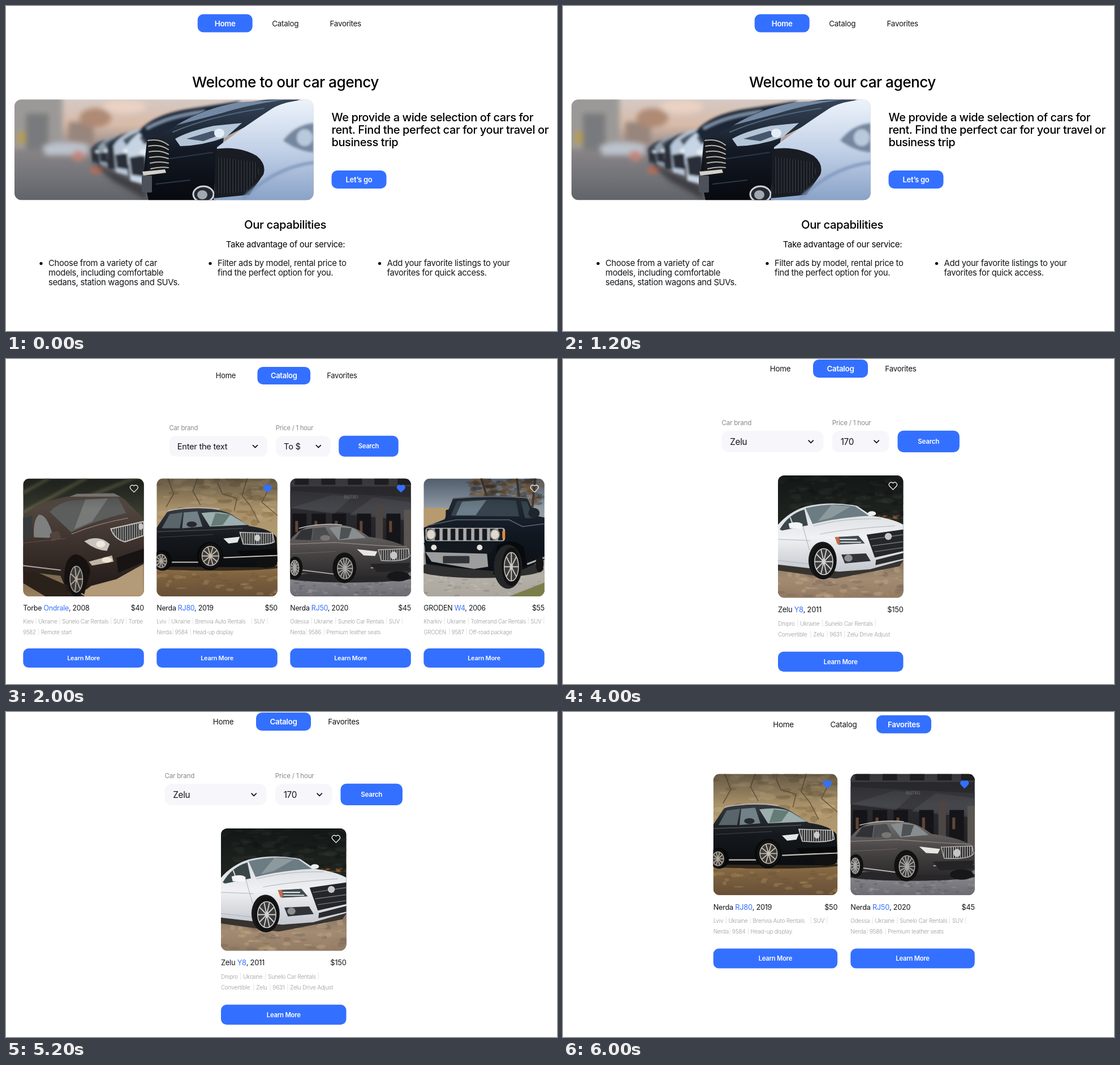
Animation, 974 px wide and 575 px high, one loop 8000 ms. Source, as an HTML page:

```html
<!DOCTYPE html>
<html lang="en">
<head>
<meta charset="utf-8">
<title>Car rental</title>
<style>
html, body { margin: 0; width: 100%; height: 100%; overflow: hidden; background: #fff; }
svg { display: block; width: 974px; height: 575px; }
text { font-family: Inter, "Open Sans", sans-serif; letter-spacing: -.02em; white-space: pre; }
</style>
</head>
<body>
<svg id="stage" viewBox="0 0 974 575"></svg>
<script>
const BLUE = '#3470ff', INK = '#121417';

// --- drawing helpers ---
const rect = (x, y, w, h, fill, r = 0, more = '') =>
  `<rect x="${x}" y="${y}" width="${w}" height="${h}" rx="${r}" fill="${fill}" ${more}/>`;
const path = (d, fill, more = '') => `<path d="${d}" fill="${fill}" ${more}/>`;
const line = (d, color, w = 1) => path(d, 'none', `stroke="${color}" stroke-width="${w}" stroke-linecap="round" stroke-linejoin="round"`);
const oval = (x, y, rx, ry, fill, more = '') => `<ellipse cx="${x}" cy="${y}" rx="${rx}" ry="${ry}" fill="${fill}" ${more}/>`;
const text = (x, y, size, s, { w = 400, fill = INK, a = 'start' } = {}) =>
  `<text x="${x}" y="${y}" font-size="${size}" font-weight="${w}" fill="${fill}" text-anchor="${a}">${s}</text>`;
const group = (x, y, k, s) => `<g transform="translate(${x} ${y}) scale(${k})">${s}</g>`;
const blur = (n, s) => `<g filter="url(#blur${n})">${s}</g>`;
const ramp = (id, colors) => `<linearGradient id="${id}" x2="0" y2="1">` +
  colors.map((c, i) => `<stop offset="${i / (colors.length - 1)}" stop-color="${c}"/>`).join('') + '</linearGradient>';

function specks(seed, n, x, y, w, h, colors, size = 5) {
  const rnd = () => (seed = seed * 16807 % 2147483647) / 2147483647;
  let s = '';
  for (let i = 0; i < n; i++)
    s += oval((x + rnd() * w).toFixed(1), (y + rnd() * h).toFixed(1), (size * (.5 + rnd())).toFixed(1),
      (size * (.2 + rnd() * .4)).toFixed(1), colors[i % colors.length], 'opacity=".4"');
  return s;
}

function wheel(x, y, rx, ry, rim = '#b9b7b3', spokes = 10) {
  let s = oval(x, y, rx, ry, '#121213') + oval(x, y, rx * .74, ry * .74, '#3b3a3a', `stroke="${rim}" stroke-width="1.5"`);
  for (let i = 0; i < spokes; i++) {
    const a = i / spokes * 2 * Math.PI;
    s += line(`M${x} ${y}l${(Math.cos(a) * rx * .7).toFixed(1)} ${(Math.sin(a) * ry * .7).toFixed(1)}`, rim, 1.8);
  }
  return s + oval(x, y, rx * .16, ry * .16, rim);
}

// --- pictures, each 213.5 x 208.5 ---
const backdrop = (fill, ground, y) => rect(0, 0, 214, 209, fill) + rect(0, y, 214, 209 - y, ground);

const brownCar = () => backdrop('url(#wood)', 'url(#track)', 120) +
  blur(2, line('M0 60L110 0M0 25L45 0M120 30L214 -8', '#5b5b42', 6) + path('M110 190L214 150V209H60Z', '#b39a78')) +
  path('M0 155L80 190L110 209H40L0 185Z', '#2b211b') +
  path('M0 66L24 47Q82 25 150 26Q176 29 188 46L213 70V151L165 178L120 190L112 196L78 200L66 172L0 164Z', 'url(#brown)') +
  path('M82 32L95 27L160 26L172 32Z', '#8c8681') +
  path('M47 59Q62 43 84 39L168 34L182 61Q125 75 85 95Z', '#5c5e5d') +
  path('M110 37L150 35L122 76L90 90Z', '#a1a29d', 'opacity=".4"') +
  path('M19 104Q17 73 28 64Q42 63 52 99L46 105Z', '#7d807e') + path('M0 70L16 66L14 104L0 108Z', '#383b3b') +
  path('M47 100Q50 91 64 94L67 106L51 111Z', '#51443d') +
  line('M86 98Q130 80 185 70', '#85776e', 1.5) + line('M0 114L75 106', '#605149', 1) + line('M0 154L66 162', '#b1a69c', 2) +
  path('M108 111Q134 98 153 116L148 128Q128 127 108 111Z', '#c9c5bd') + oval(137, 116, 8, 6, '#eee9df') +
  path('M155 89L213 76V101L180 112Q162 108 155 89Z', 'url(#bars)', 'stroke="#cac4bb" stroke-width="2"') + oval(208, 85, 4, 6, '#c4c4c4') +
  path('M116 147L157 136L160 147L122 154Z', '#c2b4a4') + oval(148, 144, 9, 5, '#efe4d1') +
  path('M165 140L213 124V148L168 167Z', '#171413') + path('M73 185Q70 140 92 134Q114 137 119 164L108 205Z', '#17120f') +
  wheel(94, 178, 15, 31, '#b6aa9c', 7);

const blackCar = () => backdrop('url(#rock)', 'url(#sand)', 130) +
  specks(7, 100, 0, 0, 214, 80, ['#c6ad82', '#75613f', '#aa9065'], 10) +
  line('M20 0L30 27L17 50M72 0L64 22L77 46M108 8L116 27L142 35L137 57M160 0L151 30L166 49L181 78M200 14L186 42L214 66', '#6b5a40', 1.6) +
  specks(4, 80, 0, 133, 214, 74, ['#a78758', '#6b5436'], 6) +
  oval(100, 157, 118, 6, '#33291c') +
  path('M0 87L18 60Q24 55 56 53Q108 50 133 64L164 84Q202 89 212 104L214 147L194 157L0 156Z', 'url(#black)') +
  line('M20 57Q65 48 110 54', '#b9b9b4', 1.8) +
  path('M9 88L23 63L46 60L41 88Z', '#59656b') + path('M48 60L72 58L81 85L45 88Z', '#728087') +
  path('M79 61Q121 55 139 69L161 82L94 85Z', '#9caeae') + path('M104 61L130 64L117 82L96 84Z', '#647b76') +
  oval(62, 81, 9, 5, '#27292d') + line('M0 94L88 91L151 88', '#555a60', 1.2) + line('M4 104L100 99', '#3e4248', 1) +
  line('M25 148L73 148M119 140L213 136', '#c7c1b5', 2.2) +
  path('M118 106L147 103L143 113L127 115Z', '#e2e6e7') +
  path('M147 95L205 97L208 112Q197 119 153 116Z', 'url(#bars)', 'stroke="#c8c8c5" stroke-width="1.5"') + oval(178, 105, 5, 6, '#c9cccd') +
  path('M143 128L212 125V135L150 137Z', '#08090b') +
  oval(94, 137, 23, 25, '#08090a') + oval(10, 145, 17, 18, '#08090a') + oval(193, 150, 20, 8, '#111') +
  wheel(95, 137, 20, 23, '#c4bcae') + wheel(8, 146, 13, 16, '#b1a99c');

const greyCar = () => backdrop('url(#street)', 'url(#cobble)', 146) +
  rect(0, 0, 214, 14, '#4d4b4d') + [8, 55, 102, 149, 190].map(x => rect(x, 0, 25, 11, '#242326')).join('') +
  path('M0 22L214 33V70L0 52Z', '#39393e') + path('M0 52L75 29L110 32L78 62ZM105 64L147 33L214 42V75Z', '#4b4c52', 'opacity=".7"') +
  text(95, 35, 7, 'BISTRO', { fill: '#77706c', w: 600 }) +
  [4, 38, 74, 118, 170].map(x => rect(x, 62, 25, 64, '#151519') + rect(x + 5, 75, 5, 20, '#614636')).join('') +
  rect(151, 38, 13, 92, '#4b4644') + rect(201, 55, 13, 75, '#5b5551') +
  specks(3, 110, 0, 158, 214, 50, ['#9a999e', '#56555b'], 4) + oval(105, 175, 112, 9, '#27272a') +
  path('M0 109Q15 88 38 84Q78 78 105 85Q119 88 139 103Q196 111 211 126L214 164L199 174L110 174L0 166Z', 'url(#grey)') +
  line('M16 88Q54 78 91 82', '#c6c3bf', 1.5) +
  path('M8 108L20 91L40 88L37 109Z', '#313236') + path('M41 88L62 86L73 107L39 109Z', '#4a4d50') +
  path('M69 87Q99 81 115 90L134 105L86 109Z', '#888e90') + path('M90 86L109 88L103 105L87 108Z', '#4d5355') +
  oval(62, 105, 9, 5, '#777575') + line('M0 116L80 113L149 118L206 121', '#88827e', 1.3) + line('M3 133L80 129', '#696461', 1) +
  line('M22 162L77 169M143 158L211 156', '#c2c0bd', 1.6) +
  path('M118 125L154 129L150 137L130 136Z', '#e6e6e2') +
  path('M156 126L209 124L212 137Q203 148 161 145Z', 'url(#bars)', 'stroke="#b6b4b1" stroke-width="1.4"') + oval(183, 136, 6, 7, '#c7c7c7') +
  path('M141 151L211 149V163L154 166Z', '#242426') +
  oval(96, 158, 21, 27, '#111') + oval(9, 158, 13, 20, '#111') + oval(191, 173, 20, 9, '#171719') +
  wheel(97, 159, 18, 25, '#aaa8a5', 14) + wheel(8, 158, 10, 18, '#aaa8a5', 12);

const boxCar = () => backdrop('url(#autumn)', 'url(#gravel)', 132) +
  rect(0, 52, 90, 50, '#b69b70') + specks(15, 140, 85, 0, 129, 44, ['#61452d', '#a4773f', '#39362c'], 8) +
  line('M165 0L174 85M102 0L114 40M197 0L190 75', '#4c3e32', 4) +
  specks(8, 90, 0, 150, 214, 58, ['#c9c5be', '#827d76'], 4) + path('M150 209L214 184V209Z', '#7c7e4a') +
  oval(100, 160, 112, 16, '#302f30') +
  path('M37 72L52 35Q118 29 183 35L199 66L214 69V143L162 167L45 157L4 151L0 87Z', 'url(#navy)') +
  path('M48 66L59 40Q111 35 163 39L169 67Z', '#36434c') + path('M68 41L111 38L92 65H57Z', '#6b7d88') +
  path('M172 40L183 41L194 70H179Z', '#35434c') + oval(195, 61, 10, 9, '#1e252d') + rect(39, 55, 9, 17, '#1a2028', 3) +
  line('M53 35Q117 29 182 34', '#6e757d', 2) + line('M8 83L57 73H151L175 85L214 80', '#586777', 1.4) +
  rect(4, 88, 139, 22, 'url(#slots)', 4, 'stroke="#b5b6b6" stroke-width="1.6"') +
  [13, 126].map(x => oval(x, 99, 8, 9, '#ded9cc', 'stroke="#848482" stroke-width="2"')).join('') +
  rect(139, 93, 5, 13, '#e18a38', 1) + path('M0 114H127L120 132L5 128Z', '#14191f') +
  path('M3 130L112 133L114 156L89 160L14 147Z', '#9d9d9d') + rect(34, 137, 47, 13, '#313337', 2) +
  [18, 99].map(x => oval(x, 122, 5, 5, '#e5e1d9')).join('') + path('M123 170L130 119Q154 102 177 121L182 155Z', '#080a0d') +
  line('M184 151L213 140', '#b1b1ae', 3) + oval(205, 151, 7, 15, '#151618') +
  oval(149, 156, 25, 39, '#242527') + wheel(155, 156, 17, 34, '#cecbc5', 8);

const whiteCar = () => backdrop('url(#forest)', 'url(#paving)', 143) +
  specks(9, 90, 0, 0, 214, 65, ['#303630', '#111511', '#29302b'], 8) +
  specks(5, 30, 165, 68, 49, 10, ['#8c4d27', '#a5683a'], 3) +
  specks(12, 110, 0, 153, 214, 54, ['#c4aa89', '#78685a', '#a0856a'], 7) +
  path('M0 145L214 144L207 155L98 176L0 162Z', '#37332f') +
  path('M0 84Q19 62 47 53Q91 43 135 52L160 69Q193 73 214 84V144L157 160L104 164L0 152Z', 'url(#white)') +
  path('M3 92Q18 66 45 58L51 85L7 94Z', '#3b4649') + line('M21 72L28 91', '#d4d5d6', 2) +
  path('M47 56Q91 45 132 53L155 69Q99 72 59 83Z', '#6c7c83') + path('M91 50L124 53L91 72L68 78Z', '#a2adb0', 'opacity=".6"') +
  path('M18 82Q34 77 42 83L41 91L20 90Z', '#f4f5f6') + oval(160, 65, 7, 4, '#eceef0') +
  line('M61 86Q116 72 175 74M72 100Q120 91 199 86', '#b9bec4', 1.2) + line('M0 109L55 111M42 86L54 128M0 145L54 151', '#afb4ba', 1) +
  path('M97 105L137 103L148 116L103 118Z', '#424b50') + line('M106 109H134M107 114H141', '#dce4e5', 2) + path('M97 105L104 105L106 117L101 117Z', '#c66b48') +
  path('M151 101L214 92V129L165 140Z', '#24272a') + line('M157 109L213 101M161 120L213 113M165 130L213 123', '#74787a', 1.3) +
  oval(188, 104, 6, 6, '#c6c9cb') + path('M108 135L150 133L158 146L114 150Z', '#303337') + oval(120, 141, 7, 6, '#8b8f91') +
  path('M167 144L214 132V142L166 153Z', '#292b2d') +
  oval(76, 145, 24, 32, '#171819') + wheel(78, 147, 21, 30, '#d1d2d3');

// --- page parts ---
function nav(active, cx, y, k = 1) {
  const item = (s, i) => (i == active ? rect(-48.5 + (i - 1) * 106.5, 0, 97, 32, BLUE, 10) : '') +
    text((i - 1) * 106.5, 21, 13.4, s, { a: 'middle', w: i == active ? 600 : 400, fill: i == active ? '#fff' : INK });
  return group(cx, y, k, ['Home', 'Catalog', 'Favorites'].map(item).join(''));
}

const button = (x, y, w, h, s, size, r = 10) => rect(x, y, w, h, BLUE, r) +
  text(x + w / 2, y + h / 2 + size * .37, size, s, { a: 'middle', w: 600, fill: '#fff' });

function filters(x, y, k, brand, price) {
  const field = (x, w, label, value) => text(x, -10, 11.2, label, { fill: '#8a8a89' }) +
    rect(x, 0, w, 36.7, '#f7f7fb', 12) + text(x + 14.3, 23.8, 14.7, value) +
    line(`M${x + w - 25.5} 16.6l4 4l4 -4`, INK, 1.7);
  return group(x, y, k, field(0, 173.5, 'Car brand', brand) + field(188.3, 97, 'Price / 1 hour', price) +
    button(299.7, -.3, 105.5, 37, 'Search', 11.1));
}

const heart = on => path('M196 24.2L190.4 18.6C186.6 14.4 192.6 8.8 196 13.2C199.4 8.8 205.4 14.4 201.6 18.6Z',
  on ? BLUE : 'none', `stroke="${on ? BLUE : '#fff'}" stroke-width="1.2" stroke-linejoin="round"`);

// Tags alternate x and label; a lone trailing x closes the row with a divider.
function tagRow(tags, y) {
  let s = '';
  for (let i = 0; i < tags.length; i += 2) {
    const x = tags[i];
    if (x) s += rect(x - 4.5, y - 10, .9, 12, INK, 0, 'opacity=".12"');
    if (tags[i + 1]) s += text(x, y, 9.7, tags[i + 1], { fill: '#9a9b9c', w: 300 });
  }
  return s;
}

function card(x, y, k, c) {
  return group(x, y, k, `<g clip-path="url(#photo)">${c.pic()}${rect(0, 0, 214, 209, 'url(#shade)')}</g>` + heart(c.fav) +
    text(0, 233.5, 12.4, `${c.make} <tspan fill="${BLUE}">${c.model}</tspan>, ${c.year}`) +
    text(213.5, 233.5, 12.4, '$' + c.price, { a: 'end' }) +
    tagRow(c.top, 256) + tagRow(c.low, 275) + button(0, 300.6, 213.5, 34, 'Learn More', 10.9, 9.5));
}

const cars = [
  { pic: brownCar, make: 'Torbe', model: 'Ondrale', year: 2008, price: 40,
    top: [0, 'Kiev', 27, 'Ukraine', 69, 'Sunelo Car Rentals', 159.5, 'SUV', 186.5, 'Torbe'], low: [0, '9582', 31.5, 'Remote start'] },
  { pic: blackCar, make: 'Nerda', model: 'RJ80', year: 2019, price: 50, fav: true,
    top: [0, 'Lviv', 26, 'Ukraine', 68, 'Brenvia Auto Rentals', 172, 'SUV', 199.5], low: [0, 'Nerda', 32.5, '9584', 64, 'Head-up display'] },
  { pic: greyCar, make: 'Nerda', model: 'RJ50', year: 2020, price: 45, fav: true,
    top: [0, 'Odessa', 42, 'Ukraine', 84.5, 'Sunelo Car Rentals', 174.5, 'SUV', 202], low: [0, 'Nerda', 32.5, '9586', 64, 'Premium leather seats'] },
  { pic: boxCar, make: 'GRODEN', model: 'W4', year: 2006, price: 55,
    top: [0, 'Kharkiv', 41, 'Ukraine', 83, 'Tolmerand Car Rentals', 189, 'SUV', 216.5], low: [0, 'GRODEN', 49.5, '9587', 80, 'Off-road package'] },
  { pic: whiteCar, make: 'Zelu', model: 'Y8', year: 2011, price: 150,
    top: [0, 'Dnipro', 37.5, 'Ukraine', 80, 'Sunelo Car Rentals', 170], low: [0, 'Convertible', 60, 'Zelu', 88, '9631', 117.5, 'Zelu Drive Adjust'] }
];

const farCar = (x, y, k, body) => group(x, y, k,
  path('M0 34Q18 5 60 -6L170 -25V60L44 106L6 96Z', body) + path('M22 20Q48 -1 105 -11L70 20L30 32Z', '#4a5666') +
  path('M4 55L32 50L36 90L8 86Z', '#2a2f37') + oval(30, 46, 8, 6, '#e4ebf2') + oval(46, 92, 13, 22, '#15181d'));

const hero = () => `<g clip-path="url(#banner)">` + rect(15, 165, 529, 179, 'url(#dusk)') +
  blur(5, rect(5, 155, 95, 98, '#9b9997') + rect(35, 190, 40, 65, '#797a7d') + rect(110, 205, 45, 40, '#98857c') +
    oval(158, 198, 28, 17, '#af8a75') + oval(210, 178, 38, 12, '#ead2c4') + rect(20, 222, 14, 22, '#b69e51') +
    path('M65 248Q105 235 145 246V264H70Z', '#bcc3cc') + oval(128, 265, 12, 9, '#c48479') + oval(158, 291, 9, 5, '#cb6b4c') +
    path('M150 275L245 318L250 344L190 310Z', '#3c3d43')) +
  blur(2, farCar(150, 240, .38, '#3a424d') + farCar(163, 234, .48, '#8f9dad') + farCar(178, 228, .6, '#2a313c') +
    farCar(190, 222, .75, '#b7c6d8') + farCar(214, 213, 1, '#c6d4e4') +
    path('M234 222Q262 190 330 181L415 168L385 190L300 217L250 244Z', '#1d2635') + line('M250 216Q290 194 350 187', '#8fa4bf', 4)) +
  path('M243 300L249 238Q265 226 300 214Q342 181 401 174L465 165H520L470 190L385 233L371 344H252Z', 'url(#coal)') +
  path('M301 211Q350 181 413 170L493 166Q430 174 380 190Z', '#7489a4') + line('M295 223Q360 195 456 181', '#53647b', 2) +
  path('M299 235Q321 222 367 212L417 207L389 232Q348 247 308 248Z', '#b5c5d8') + path('M319 235L365 221L383 226L349 239Z', '#46566b') + oval(377, 225, 9, 8, '#e4eef8') +
  path('M249 237Q278 228 287 251L289 279Q279 302 250 292Z', '#16191d') +
  [0, 1, 2, 3, 4, 5].map(i => line(`M${251 + i} ${238 + i * 10}Q272 ${234 + i * 10} 287 ${246 + i * 8}`, '#b8b4ae', 2)).join('') +
  path('M241 293L281 289L283 295L243 300Z', '#d4d0ca') + rect(240, 300, 18, 30, '#4d5159', 2) + line('M290 270L365 259M265 315L325 308', '#2d3744', 2) +
  oval(349, 333, 18, 14, '#262a30', 'stroke="#d0d4d8" stroke-width="3"') + oval(347, 334, 9, 8, '#a0a9b2') +
  path('M367 344L373 250Q413 219 468 183Q490 167 544 165V344Z', 'url(#ice)') +
  path('M370 253Q412 247 443 265Q461 280 455 298L430 334L368 340Z', '#191c22') + path('M374 267L443 276L448 295L426 329L371 332Z', 'url(#mesh)') +
  blur(2, path('M490 238Q510 211 544 207V259Q516 257 490 238Z', '#75879f') + oval(528, 233, 14, 15, '#b9c9dd') + line('M420 340Q476 285 544 277', '#8199bd', 5)) + '</g>';

function home() {
  const bullets = [[75, 'Choose from a variety of car', 'models, including comfortable', 'sedans, station wagons and SUVs.'],
    [374, 'Filter ads by model, rental price to', 'find the perfect option for you.'],
    [673.5, 'Add your favorite listings to your', 'favorites for quick access.']];
  const mid = w => ({ a: 'middle', w, fill: '#000' });
  return nav(0, 493.7, 14.5) + text(494, 144, 26.2, 'Welcome to our car agency', mid(500)) + hero() +
    ['We provide a wide selection of cars for', 'rent. Find the perfect car for your travel or', 'business trip']
      .map((s, i) => text(575.5, 204 + i * 22, 20, s, { w: 500, fill: '#000' })).join('') +
    button(575.5, 291, 97, 32, 'Let\u2019s go', 13) +
    text(493.5, 394, 20.3, 'Our capabilities', mid(500)) + text(494, 427, 15, 'Take advantage of our service:', mid(400)) +
    bullets.map(([x, ...rows]) => oval(x - 13, 455.5, 2.6, 2.6, '#000') +
      rows.map((s, i) => text(x, 460.3 + i * 16.7, 14.8, s)).join('')).join('');
}

const scenes = [
  home(),
  nav(1, 491.2, 14, .965) + filters(288.5, 136, 1, 'Enter the text', 'To $') +
    cars.slice(0, 4).map((c, i) => card(30.3 + i * 236, 211.5, 1, c)).join(''),
  nav(1, 490.5, 1) + filters(280.5, 127, 1.0375, 'Zelu', '170') + card(380, 206, 1.0375, cars[4]),
  nav(2, 496, 5.7) + card(265.7, 109.6, 1.028, cars[1]) + card(508.3, 109.6, 1.028, cars[2])
];

const stripes = (id, w, dark, light) => `<pattern id="${id}" width="${w}" height="${w}" patternUnits="userSpaceOnUse">` +
  rect(0, 0, w, w, dark) + rect(0, 0, w * .4, w, light) + '</pattern>';
const clip = (id, ...box) => `<clipPath id="${id}">${rect(...box)}</clipPath>`;
const ramps = {
  wood: ['#262a20', '#45473a', '#5d5946'], track: ['#55483a', '#9b805f'], brown: ['#594d47', '#3d322d', '#211a18'],
  rock: ['#9b8662', '#b49b71', '#87704c'], sand: ['#ad8c5d', '#806340', '#665038'], black: ['#353a40', '#15181d', '#0b0d10'],
  street: ['#333236', '#242327', '#373131'], cobble: ['#59585d', '#85848a', '#6c6b71'], grey: ['#777271', '#4b4747', '#2c2a2b'],
  autumn: ['#7c8fa5', '#a3a5a1', '#6d5b42'], gravel: ['#898078', '#b5b0a8', '#aaa59d'], navy: ['#242b35', '#111720', '#0c1015'],
  forest: ['#151a18', '#222722', '#292c27'], paving: ['#80705f', '#a48c72', '#927a63'], white: ['#d4d8dc', '#f0f1f3', '#c3c7ce'],
  dusk: ['#d5c9c4', '#d8bba9', '#898486', '#74757a', '#626369'], coal: ['#364558', '#131a25', '#07090d'], ice: ['#edf3fb', '#c2d1e7', '#89a2c8']
};
const defs = '<defs>' + Object.entries(ramps).map(([id, c]) => ramp(id, c)).join('') +
  '<linearGradient id="shade" x2="0" y2="1"><stop stop-color="#121417" stop-opacity=".4"/><stop offset=".25" stop-color="#121417" stop-opacity="0"/></linearGradient>' +
  stripes('bars', 4, '#292a2c', '#aaa9a6') + stripes('slots', 14, '#17191d', '#a9abac') + stripes('mesh', 5, '#15181d', '#2b3038') +
  clip('photo', 0, 0, 213.5, 208.5, '#000', 11) + clip('banner', 15, 165.5, 528.5, 177.8, '#000', 12) +
  [2, 5].map(n => `<filter id="blur${n}"><feGaussianBlur stdDeviation="${n}"/></filter>`).join('') + '</defs>';

const stage = document.getElementById('stage');
stage.innerHTML = defs + scenes.map(s => `<g class="scene" display="none">${s}</g>`).join('');
const layers = stage.querySelectorAll('.scene');

let start;
function tick(now) {
  start ??= now;
  const current = Math.floor((now - start) % 8000 / 2000);
  layers.forEach((g, i) => g.setAttribute('display', i == current ? 'inline' : 'none'));
  requestAnimationFrame(tick);
}
requestAnimationFrame(tick);
</script>
</body>
</html>
```
